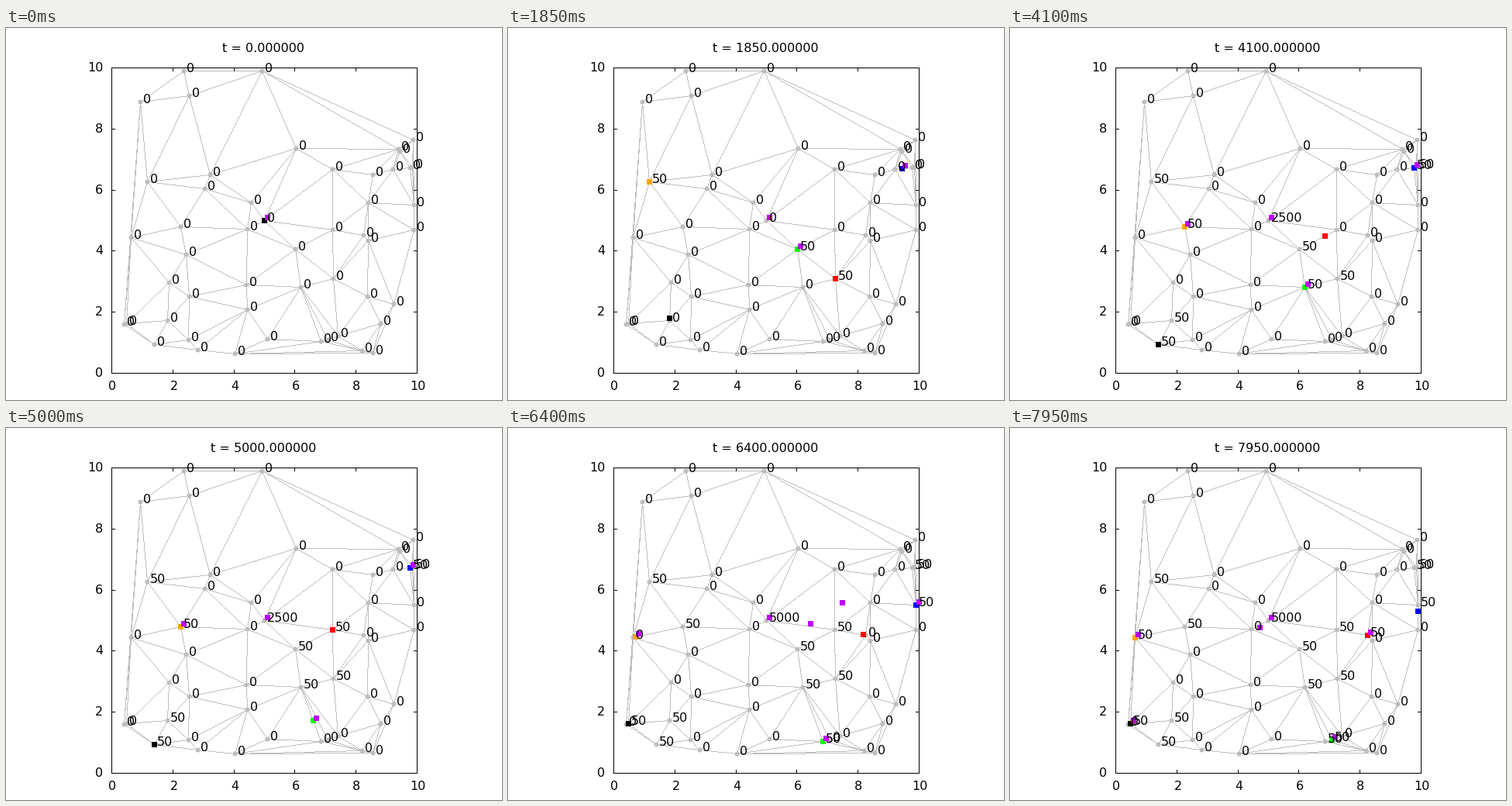
A matplotlib script for the animation above (8000 ms loop, 640 by 480 pixels).

```python
import numpy as np
import matplotlib.pyplot as plt
from matplotlib.animation import FuncAnimation
from matplotlib.patches import Rectangle
from matplotlib.tri import Triangulation

W, H, DPI = 640, 480, 100
STEP, FRAMES = 50, 160      # ms per frame, frames per loop
LEFT, TOP, SIDE = 136, 51, 394
RIGHT, BOTTOM = LEFT + SIDE, TOP + SIDE
UNIT = SIDE / 10
OFF = 0.1 * UNIT            # shift of labels and drones
SPEED, WAIT = 0.1074, 1800  # truck speed in px/ms, stop in ms
MARK = 7                    # side of a square marker
GRAY, PURPLE = 190, "#c000ff"

plt.rcParams["font.family"] = "DejaVu Sans"
plt.rcParams["font.size"] = 16 * 72 / DPI

# Stage pixels of the nodes
SITES = dict(
    A=(229, 55), B=(330, 55), C=(173, 95), D=(236, 87), E=(182, 198),
    F=(263, 189), G=(256, 207), H=(374, 155), I=(421, 182), J=(316, 225),
    K=(333, 248), L=(311, 259), M=(225, 256), N=(161, 270), O=(232, 292),
    P=(210, 328), Q=(236, 346), R=(208, 377), S=(152, 382), T=(155, 381),
    U=(191, 408), V=(235, 402), W=(247, 415), X=(295, 420), Y=(337, 401),
    Z=(311, 363), a=(310, 331), b=(373, 285), c=(380, 334), d=(422, 323),
    e=(421, 260), f=(461, 267), g=(467, 274), h=(467, 225), i=(473, 189),
    j=(499, 182), k=(506, 156), l=(508, 159), m=(525, 144), n=(521, 180),
    y=(524, 179), o=(526, 228), p=(526, 260), q=(466, 346), r=(500, 356),
    s=(483, 381), t=(428, 397), u=(415, 402), v=(406, 404), w=(459, 416),
    x=(473, 419))
NODES = {key: np.array(xy) + 0.5 for key, xy in SITES.items()}

# Paths over the nodes; a bar separates the stops
ROUTES = dict(
    black="KLOPR|U|T",
    orange="KJGE|M|N|O",
    lime="Kb|c|v|u",
    red="Kbd|cbe|f",
    blue="KIijny|n|o|p",
    depot="K")

# Drone: first host, then (launch time, next host)
DRONES = [
    ("blue", (2105, "orange"), (6615, "black")),
    ("depot", (2600, "red"), (3145, "blue"), (5943, "orange")),
    ("depot", (5000, "red"), (5422, "blue"), (6970, "orange")),
    ("depot", (6150, "red")),
    ("lime",),
    ("depot",)]

visits = {}                 # node -> time of the first stop there


def timetable(route):
    """Times and positions of the corners of a truck's route."""
    now, here = 0.0, NODES[route[0]]
    times, points = [now], [here]
    for n, leg in enumerate(route.split("|")):
        if n:
            now += WAIT
            times.append(now)
            points.append(here)
        for key in leg:
            now += np.hypot(*(NODES[key] - here)) / SPEED
            here = NODES[key]
            times.append(now)
            points.append(here)
        visits.setdefault(leg[-1], now)
    return np.array(times), np.array(points)


TABLES = {name: timetable(route) for name, route in ROUTES.items()}


def truck_at(name, t):
    times, points = TABLES[name]
    return np.array([np.interp(t, times, points[:, k]) for k in (0, 1)])


def meeting(start, launch, host):
    """Time at which a drone catches the moving host."""
    t = launch
    for _ in range(60):
        t = launch + np.hypot(*(truck_at(host, t) - start)) / (2 * SPEED)
    return t


def plan_flights(host, *hops):
    flights = []
    for launch, goal in hops:
        start = truck_at(host, launch)
        land = meeting(start, launch, goal)
        flights.append((launch, land, start, truck_at(goal, land), goal))
        host = goal
    return flights


PLANS = [(drone[0], plan_flights(*drone)) for drone in DRONES]


def drone_at(plan, t):
    host, flights = plan
    for launch, land, start, end, goal in flights:
        if t < launch:
            break
        if t < land:
            return start + (end - start) * (t - launch) / (land - launch)
        host = goal
    return truck_at(host, t)


def label_of(key, t):
    if key == "K":
        return "5000" if t >= 6150 else "2500" if t >= 2500 else "0"
    return "50" if t >= visits.get(key, np.inf) else "0"


# Hard-edged one-pixel lines and dots, painted on a plain raster
canvas = np.full((H, W), 255, np.uint8)


def line(p, q, shade):
    n = int(max(abs(q[0] - p[0]), abs(q[1] - p[1]))) + 1
    xs, ys = np.linspace(p, q, n).T
    canvas[np.rint(ys).astype(int), np.rint(xs).astype(int)] = shade


def dot(p, radius, shade):
    yy, xx = np.ogrid[:H, :W]
    canvas[(xx - p[0]) ** 2 + (yy - p[1]) ** 2 <= radius ** 2] = shade


fig = plt.figure(figsize=(W / DPI, H / DPI), dpi=DPI, facecolor="white")
ax = fig.add_axes([0, 0, 1, 1])
ax.axis("off")

# Network
spots = np.array(list(SITES.values()))
for start, end in Triangulation(*spots.T).edges:
    line(spots[start], spots[end], GRAY)
for spot in spots:
    dot(spot, 3, GRAY)

# Frame, ticks and tick labels
for edge in (TOP, BOTTOM):
    line((LEFT, edge), (RIGHT, edge), 0)
for edge in (LEFT, RIGHT):
    line((edge, TOP), (edge, BOTTOM), 0)
for value in range(0, 11, 2):
    x, y = round(LEFT + value * UNIT), round(BOTTOM - value * UNIT)
    line((x, TOP), (x, TOP + 4), 0)
    line((x, BOTTOM), (x, BOTTOM - 4), 0)
    line((LEFT, y), (LEFT + 4, y), 0)
    line((RIGHT, y), (RIGHT - 4, y), 0)
    ax.text(x + 1.5, 467, str(value), ha="center", va="baseline")
    ax.text(125.5, y + 5, str(value), ha="right", va="baseline")

ax.imshow(canvas, cmap="gray", vmin=0, vmax=255, extent=(0, W, H, 0),
          interpolation="nearest", aspect="auto", zorder=0)
ax.set_xlim(0, W)
ax.set_ylim(H, 0)


def square(color, z):
    return ax.add_patch(Rectangle((0, 0), MARK, MARK, color=color, lw=0,
                                  snap=False, zorder=z))


def place(mark, xy):
    mark.set_xy(np.rint(xy - MARK / 2))


title = ax.text(332, 31, "", ha="center", va="baseline")
labels = {key: ax.text(x + OFF - 0.7, y + 1.2, "0", va="baseline", zorder=6)
          for key, (x, y) in NODES.items()}
trucks = {name: square(name, 4) for name in ROUTES if name != "depot"}
drones = [square(PURPLE, 5) for _ in PLANS]


def draw(frame):
    t = frame * STEP
    title.set_text("t = %f" % t)
    for key, text in labels.items():
        text.set_text(label_of(key, t))
    for name, mark in trucks.items():
        place(mark, truck_at(name, t))
        # all trucks share the depot at the start; black lies on top
        mark.set_visible(t > 0 or name == "black")
    for mark, plan in zip(drones, PLANS):
        place(mark, drone_at(plan, t) + (OFF, -OFF))
    return [title, *drones, *labels.values(), *trucks.values()]


anim = FuncAnimation(fig, draw, frames=FRAMES, interval=STEP,
                     init_func=lambda: draw(0), repeat=True, repeat_delay=0)
plt.show()
```
